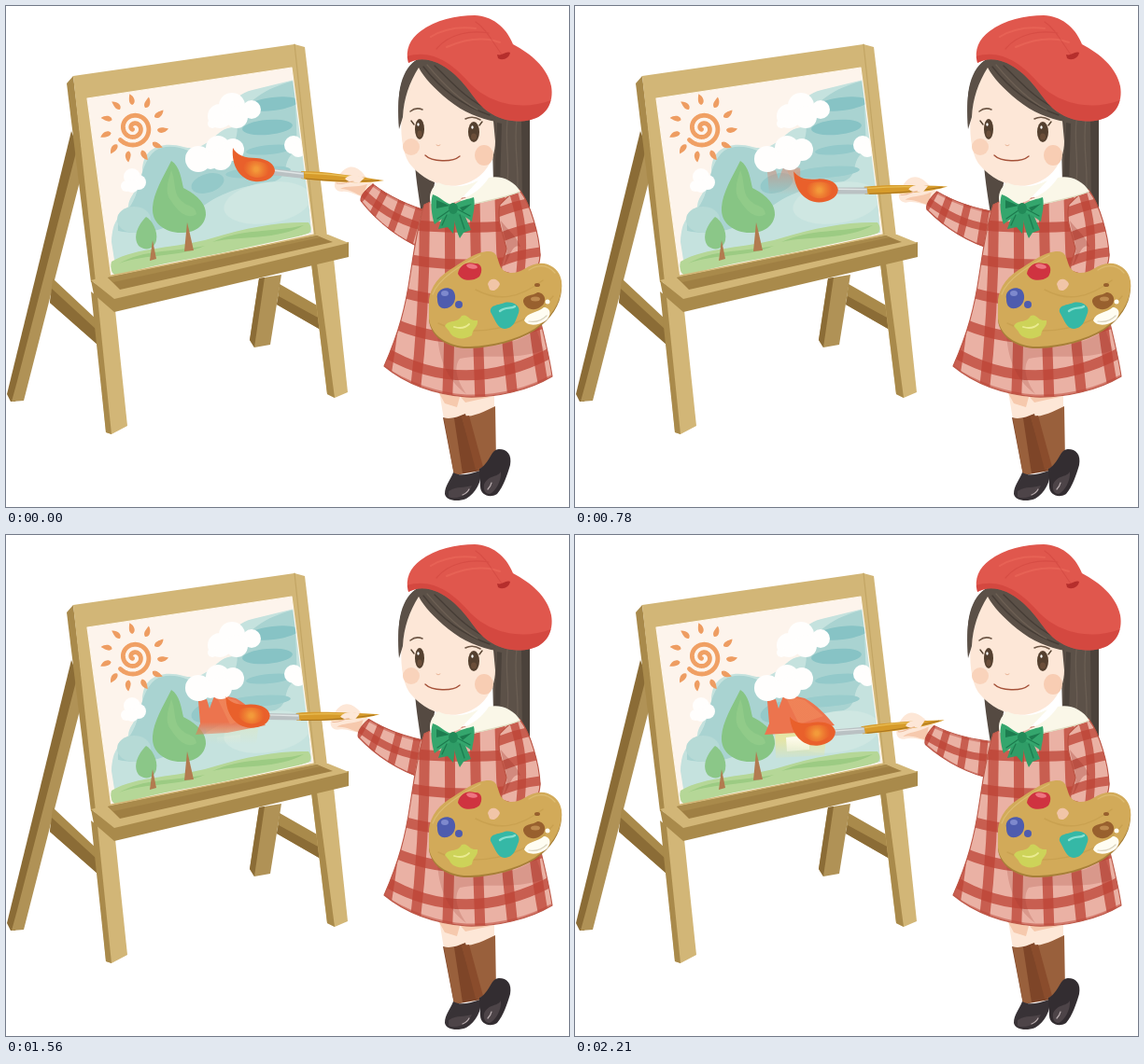
These frames come from a looping animation (603 px wide and 537 px high, 2.34 s). An HTML page with a canvas:

```html
<!DOCTYPE html>
<html lang="en">
<head>
<meta charset="utf-8">
<title>Girl painting</title>
<style>
html, body { margin: 0; width: 100%; height: 100%; overflow: hidden; background: #fff; }
canvas { display: block; width: 603px; height: 537px; }
</style>
</head>
<body>
<canvas id="stage"></canvas>
<script>
const STEP = 130, STEPS = 18;
const canvas = document.getElementById('stage');
const ctx = canvas.getContext('2d');
const dpr = window.devicePixelRatio || 1;
canvas.width = 603 * dpr;
canvas.height = 537 * dpr;

const clamp = (v, a = 0, b = 1) => Math.min(b, Math.max(a, v));

function fill(color, d) {
  ctx.fillStyle = color;
  ctx.fill(new Path2D(d));
}
function line(color, width, d) {
  ctx.strokeStyle = color;
  ctx.lineWidth = width;
  ctx.lineCap = ctx.lineJoin = 'round';
  ctx.stroke(new Path2D(d));
}
function oval(color, x, y, rx, ry = rx, turn = 0) {
  ctx.fillStyle = color;
  ctx.beginPath();
  ctx.ellipse(x, y, rx, ry, turn, 0, 7);
  ctx.fill();
}
function clipped(d, draw) {
  ctx.save();
  ctx.clip(new Path2D(d));
  draw();
  ctx.restore();
}

const WOOD = '#d2b677', WOOD_MID = '#a98a4b', WOOD_DARK = '#8b6c36';

function easel() {
  // rear legs and braces
  fill(WOOD_DARK, 'M70 134L80 160L10 424L5 424L1 416Z');
  fill('#b09256', 'M75 157L86 160L80 184L19 423L6 424L12 402Z');
  fill(WOOD_MID, 'M50 292L97 336V362L47 318Z');
  fill(WOOD_DARK, 'M49 303L97 347V362L47 318Z');
  fill('#b09256', 'M271 292L295 288L283 363L266 366L261 358Z');
  fill(WOOD_DARK, 'M271 292L277 291L266 366L261 358Z');
  fill(WOOD_MID, 'M293 298L335 322L337 347L290 320Z');
  fill(WOOD_DARK, 'M292 311L336 335L337 347L290 320Z');
  // front legs
  fill(WOOD, 'M327 276L351 271L366 414L352 420L344 416Z');
  fill(WOOD_MID, 'M327 276L333 276L352 420L344 416Z');
  fill(WOOD, 'M93 308L117 326L130 450L113 459L107 457Z');
  fill(WOOD_MID, 'M91 306L98 312L113 459L107 457Z');
  // board
  fill(WOOD_MID, 'M65 83L72 75L98 296L91 296Z');
  fill(WOOD, 'M72 75L309 41L320 44L344 247L330 250L96 296Z');
  line('#c2a564', 1.2, 'M309 41L331 245');
}

function tray() {
  fill(WOOD_MID, 'M91 294L116 312L367 253V269L116 328L94 309Z');
  fill(WOOD, 'M91 294L109 289L333 245L345 245L367 254L116 314Z');
  fill('#9f7f43', 'M109 291L333 246L350 253L122 304Z');
  fill(WOOD_MID, 'M109 291L333 246L337 248L115 296Z');
}

function cloud(puffs) {
  for (const [x, y, r] of puffs) oval('#fffefd', x, y, r);
}

function sun(x, y) {
  ctx.strokeStyle = '#f0a064';
  ctx.lineCap = 'round';
  ctx.lineWidth = 4.8;
  ctx.beginPath();
  for (let a = 0; a < 12.6; a += 0.1) {
    const r = 2 + a * 1.36;
    ctx.lineTo(x + r * Math.cos(a + 2.4), y + r * Math.sin(a + 2.4));
  }
  ctx.stroke();
  for (let i = 0; i < 11; i++) {
    ctx.save();
    ctx.translate(x, y);
    ctx.rotate(i * Math.PI / 5.5 + 0.07);
    fill('#ee9d62', 'M25 0C27 -4 32 -3 37 -2C34 3 27 5 25 0Z');
    ctx.restore();
  }
}

function house(k) {
  if (k < 2) return;
  const edge = 174 + k * 3.7;
  const shade = (rgb, a) => {
    const g = ctx.createLinearGradient(0, edge - 18, 0, edge + 6);
    g.addColorStop(0, `rgba(${rgb},${a})`);
    g.addColorStop(1, `rgba(${rgb},0)`);
    return g;
  };
  ctx.save();
  ctx.beginPath();
  ctx.rect(200, 160, k < 7 ? 22 + k * 3.2 : 90, 90);
  ctx.clip();
  const wall = clamp((k - 9) / 8);
  if (wall) {
    fill(shade('229,229,166', wall), 'M214 207L233 206L270 207L267 236L215 239Z');
    fill(shade('252,250,234', wall), 'M226 217L251 214L251 230L227 232Z');
  }
  const a = clamp((k - 1) / 11);
  const red = k < 11 ? '224,130,107' : '236,116,78';
  fill(shade(red, a), 'M206 178L215 176L218 186L224 170L246 175C259 182 270 194 278 204L237 212L203 214L208 202Z');
  fill(shade('243,145,97', a * 0.5), 'M225 172L246 177L266 194L240 203Z');
  ctx.restore();
}

function painting(k) {
  const sheet = 'M87 99L306 66L329 244L113 291Z';
  clipped(sheet, () => {
    fill('#fdf4ec', sheet);
    fill('#c5e2de', 'M113 253C114 228 122 226 131 215C132 201 143 199 146 177C146 151 168 145 190 151C217 158 223 131 243 130C234 118 239 96 264 90L313 78L327 243L116 272Z');
    fill('#a9d3d1', 'M132 216C146 198 142 169 160 155C174 146 197 152 211 166C238 171 251 142 247 125C257 102 277 88 309 80L312 154C291 167 309 184 281 190C252 192 220 203 198 226C174 236 154 248 120 241C119 230 124 222 132 216Z');
    const wash = '#87c3c5';
    oval(wash, 286, 105, 28, 7, -0.12);
    oval(wash, 280, 130, 27, 8, -0.08);
    oval('#93c9ca', 282, 154, 25, 5, -0.1);
    oval('#99cccc', 270, 178, 35, 6, -0.08);
    oval('#94c9c9', 216, 190, 18, 10, -0.3);
    oval('#b6dad6', 137, 229, 18, 14);
    oval('#cfe7e2', 280, 211, 47, 22, -0.15);
    // ground
    fill('#b5d797', 'M113 274C139 258 183 260 220 249C258 237 294 231 324 232C328 237 327 243 323 244C276 261 180 270 119 289C113 288 111 281 113 274Z');
    fill('#9ccb83', 'M121 276C151 265 184 270 213 257C177 264 147 261 121 276ZM221 253C253 238 287 243 319 235C292 251 251 246 221 253Z');
    // trees
    fill('#87c584', 'M177 166C186 171 188 186 190 195C202 201 215 211 214 224C212 239 198 244 184 243C168 241 156 232 157 216C158 200 168 184 177 166Z');
    fill('rgba(160,210,146,.4)', 'M177 176C182 187 179 199 186 207C195 217 202 212 204 223C194 230 183 219 177 209C169 200 174 187 177 176Z');
    fill('#b27b50', 'M194 232L196 240L201 262L191 263Z');
    fill('#8bc788', 'M150 226C156 229 163 241 161 251C159 261 149 263 142 257C135 247 142 234 150 226Z');
    fill('#b27b50', 'M157 251L161 271L154 273Z');
    house(k);
    cloud([[206, 164, 14], [227, 152, 13], [243, 154, 12], [230, 164, 12], [219, 165, 10]]);
    cloud([[229, 118, 13], [242, 107, 14], [263, 111, 10], [247, 119, 12], [221, 126, 5]]);
    cloud([[135, 183, 9], [129, 193, 6], [142, 189, 8], [135, 193, 7]]);
    cloud([[308, 149, 10], [313, 154, 8]]);
    sun(137, 131);
  });
  line('#fff7ec', 1.2, sheet);
}

const SKIN = '#fde7d7', SKIN_SHADE = '#f6c9ad', CLOTH = '#eab1a4', BAND = 'rgba(190,69,54,.76)';

function legs() {
  fill(SKIN, 'M464 413L491 416L492 445L469 443Z');
  fill(SKIN, 'M484 414H523V434L490 442Z');
  fill(SKIN_SHADE, 'M464 415L486 419L483 430L470 426ZM487 419L519 419L492 425Z');
  fill('#7e4528', 'M468 441C476 444 484 440 492 437L509 498L480 503Z');
  fill('#99603c', 'M469 442L480 442L489 501L480 503Z');
  fill('#99603c', 'M488 440C499 441 512 435 524 429L525 488L505 497Z');
  fill('#8a4c2c', 'M488 440L496 439L511 494L503 497Z');
  fill('#383236', 'M479 500C487 505 498 501 508 498C510 510 503 522 493 528C483 532 471 530 470 523C470 514 476 508 479 500Z');
  fill('#4d4448', 'M474 520C483 514 491 517 499 514C495 524 483 530 474 526Z');
  fill('#332d31', 'M507 496C518 491 519 475 528 475C537 475 542 481 540 492C537 502 533 515 526 523C518 528 508 524 508 515Z');
  fill('#4d4448', 'M512 513C517 502 526 506 530 499C531 508 525 520 518 523C513 523 511 518 512 513Z');
  line('#b9adaf', 1.2, 'M489 524Q494 522 496 518M516 518Q519 515 520 511');
}

function backHair() {
  fill('#5c5148', 'M520 105H561V224C551 209 536 204 522 190Z');
  fill('#4b423b', 'M552 122L561 118V224L553 211ZM526 125L531 126L529 193L523 187Z');
  line('#6a5e53', 1.3, 'M537 123C534 150 541 171 536 195M547 122C543 153 551 175 547 206');
  fill('#554a42', 'M437 155L460 184L455 214L445 223C442 203 438 180 437 155Z');
}

function arm(p) {
  ctx.save();
  ctx.translate(448, 240 + 2 * p);
  ctx.rotate(-11 * Math.PI / 180 * p);
  ctx.translate(-448, -240);
  // hand
  fill(SKIN, 'M352 190C355 183 360 175 367 173C375 171 381 177 386 184L394 192L383 205C375 203 368 198 360 199C355 199 351 196 352 190Z');
  fill(SKIN_SHADE, 'M358 196C365 192 374 195 387 191L382 204C375 202 369 196 358 196Z');
  // sleeve
  const sleeve = 'M393 191C410 204 431 214 456 221L466 255L446 260C422 250 398 232 380 209C379 203 386 196 393 191Z';
  fill(CLOTH, sleeve);
  clipped(sleeve, () => {
    line(BAND, 8, 'M391 190L380 206M407 196L392 225M425 206L411 244M444 212L431 258');
    line(BAND, 8, 'M384 202C406 222 426 233 459 240');
    line('rgba(186,66,52,.45)', 5, 'M393 191C412 205 430 214 454 220M380 211C398 234 420 251 444 260');
  });
  line('#b95040', 1, sleeve);
  // brush
  fill('#d69b2b', 'M316 177C340 177 373 182 405 187C385 191 350 189 316 185Z');
  line('#e9bd53', 1.3, 'M320 179Q350 180 375 184');
  line('#a8741f', 1, 'M321 185Q360 189 399 187');
  fill('#bac1c3', 'M283 174L319 178V185L284 181Z');
  line('#e0e6e6', 1.3, 'M286 176L318 180');
  fill('#e9602b', 'M243 152C247 160 256 163 268 163C281 164 288 170 288 177C286 186 276 189 266 188C251 186 241 172 243 152Z');
  const glow = ctx.createRadialGradient(268, 175, 2, 268, 175, 14);
  glow.addColorStop(0, '#f39a3a');
  glow.addColorStop(1, 'rgba(240,138,50,0)');
  fill(glow, 'M252 169C264 163 280 166 286 176C275 188 257 187 252 169Z');
  // thumb over the handle
  fill(SKIN, 'M363 185C368 180 376 181 384 184L378 190C372 188 367 190 363 185Z');
  line('#eebc9e', 1, 'M354 190C361 192 366 188 372 188');
  ctx.restore();
}

function dress() {
  const body = 'M448 213C458 207 470 205 490 206L550 197C559 209 564 225 567 241L572 267L565 307C572 338 580 364 585 397C560 412 525 420 493 419C458 416 428 405 405 386C421 350 428 322 433 288C437 263 440 238 448 213Z';
  fill(CLOTH, body);
  clipped(body, () => {
    for (let i = -1; i < 5; i++) {
      const top = 448 + 27 * i, low = 437 + 35.5 * i;
      line(BAND, 11, `M${top} 205Q${top + 2} 320 ${low} 425`);
    }
    for (let i = 0; i < 5; i++) {
      const y = 232 + 34 * i, sag = 8 + i * 7;
      line(BAND, 11, `M398 ${y - 2}Q490 ${y + sag * 1.6} 594 ${y - 2}`);
    }
    line('rgba(190,69,54,.5)', 5, 'M402 386C428 406 464 417 493 419C530 420 560 412 588 396');
    fill('rgba(151,54,42,.2)', 'M462 350C485 369 534 371 568 347L576 369C543 381 507 372 486 378C478 389 485 404 493 416C470 399 463 374 462 350Z');
  });
  line('#bd5848', 1.1, body);
  // bent sleeve
  const sleeve = 'M529 213C538 203 546 197 551 199C562 213 571 245 572 266C572 280 565 289 555 291L531 284C529 275 535 269 536 260C532 242 525 229 529 213Z';
  fill(CLOTH, sleeve);
  clipped(sleeve, () => {
    line(BAND, 10, 'M525 222Q545 214 565 210M530 248Q548 240 575 235M528 275Q551 265 577 263');
    line(BAND, 9, 'M543 198C551 224 556 247 550 294');
    fill('rgba(154,49,39,.3)', 'M530 230C537 240 546 245 551 258C542 253 539 272 533 279C541 259 533 249 530 230Z');
  });
  line('#b95040', 1.1, sleeve);
}

function collarAndBow() {
  fill('#faf7e8', 'M455 212C452 203 456 194 463 189C476 196 492 194 506 187L486 208L470 215Z');
  fill('#faf7e8', 'M486 208C500 203 511 194 517 184C530 181 544 187 551 199C537 205 518 208 497 214Z');
  line('#dedcc0', 1.1, 'M497 213C519 208 536 205 550 199');
  const green = '#2f9d67';
  fill(green, 'M470 218L463 239L473 237L479 244L482 220Z');
  fill(green, 'M479 219C480 231 482 240 486 249L490 243L498 240L489 219Z');
  fill('#34a66d', 'M477 213C470 211 464 204 457 202C454 211 456 225 459 234C466 229 473 223 478 221Z');
  fill('#34a66d', 'M480 213C487 208 495 207 501 205C503 214 500 223 499 231C492 226 486 222 480 221Z');
  fill('#1d7c4f', 'M461 208L475 214L461 217ZM486 216L499 212L489 220Z');
  line('#1d7c4f', 1.3, 'M462 228L475 219M472 224L467 235M486 224L491 239M484 218L497 225');
  oval('#228a58', 479, 217, 5, 6);
}

function head() {
  fill('#564b43', 'M421 116C418 82 429 59 448 54C490 52 517 81 525 128L519 162L438 162Z');
  fill(SKIN, 'M425 105C431 83 437 72 442 62C458 80 485 105 521 112L524 145C524 169 508 188 486 192C466 196 446 185 434 171C424 160 421 132 425 105Z');
  oval('#f9d3bb', 434, 151, 9, 9);
  oval('#f8cdb3', 512, 160, 10, 11);
  // eyes
  for (const [x, y, rx] of [[443, 132, 5], [501, 135, 6]]) {
    oval('#54402f', x, y, rx, 11);
    oval('#6b4e39', x, y + 5, rx * 0.5, 3.5);
    oval('#fff', x - 1.5, y - 5, 1.2, 1.8);
  }
  line('#54402f', 1.4, 'M437 127L434 123M507 128L510 124');
  line('#6f5847', 1.6, 'M433 113Q439 108 446 111M492 121Q500 117 508 122');
  line('#e9b598', 1, 'M461 149Q463 151 465 149');
  line('#a55239', 1.4, 'M449 160C456 167 478 168 486 161');
  // fringe
  fill('#5b5047', 'M437 60C451 49 477 56 498 76C511 90 520 104 525 124C508 121 490 114 474 101C458 88 448 77 442 66C432 82 426 99 425 119L421 132C418 95 423 74 437 60Z');
  line('#463d36', 1.4, 'M447 65C464 87 487 106 518 117M459 64C478 82 495 102 516 110');
  line('#6d6054', 1.2, 'M451 63C466 81 486 101 505 111');
}

function beret() {
  const shape = 'M431 61C427 47 433 35 444 27C460 15 482 10 502 10C520 11 535 21 543 41C562 51 580 66 584 86C587 103 579 118 562 122C545 126 529 122 516 113C502 103 497 88 479 72C463 58 445 53 431 61Z';
  fill('#e0574d', shape);
  clipped(shape, () => {
    fill('rgba(201,58,52,.5)', 'M429 54C455 46 477 60 496 82C516 104 552 114 586 100V128H520L474 78L429 66Z');
    line('rgba(242,117,101,.35)', 2, 'M455 33C470 24 486 22 503 24M472 44C493 35 512 33 529 39');
    line('rgba(193,55,50,.3)', 1.2, 'M461 46C475 29 498 26 517 29M503 17C514 24 520 37 531 52');
  });
  fill('#b52e2c', 'M526 52C531 54 535 48 540 50C539 56 532 59 527 56Z');
}

function palette() {
  const shape = 'M453 320C452 307 460 292 475 283C488 275 500 265 515 263C526 262 526 270 529 278C533 288 545 288 555 282C565 275 577 273 586 280C593 285 596 293 595 302C594 318 584 334 566 346C546 358 521 364 497 365C474 366 455 353 453 335Z';
  ctx.save();
  ctx.translate(0, 2);
  fill('#a77f38', shape);
  ctx.restore();
  fill('#d2aa59', shape);
  line('#dcbb70', 1.2, 'M457 309C463 292 487 278 508 267M560 283C570 277 580 277 588 286');
  line('rgba(180,138,62,.3)', 1.5, 'M463 340C497 357 557 347 586 311M503 304C527 317 549 314 575 294');
  fill('#cf3340', 'M484 287C485 278 494 273 502 276C510 275 511 284 507 290C499 296 488 295 484 287Z');
  oval('#ee7580', 499, 279, 6, 2.5, 0.2);
  fill('#f1c5a7', 'M516 298C518 290 527 292 529 298C527 303 523 307 518 304Z');
  fill('#4e5cae', 'M462 314C460 305 470 299 478 304C484 310 481 322 472 324C465 325 462 321 462 314Z');
  oval('#7e89cd', 470, 308, 4, 3);
  oval('#4e5cae', 485, 320, 4);
  fill('#cdd359', 'M470 343C475 335 483 341 488 332C495 329 495 338 505 337C506 344 500 345 499 353C488 360 477 355 475 349Z');
  line('#eaeb91', 1.8, 'M480 344Q490 347 496 341');
  fill('#35b8a6', 'M519 328C518 320 527 321 534 318C542 316 552 321 549 329C546 336 545 345 534 346C527 346 524 337 519 328Z');
  line('#8adfd0', 2.4, 'M529 327C535 322 541 325 545 322');
  fill('#98602e', 'M554 317C554 309 564 311 569 307C578 307 580 318 573 322C566 328 556 325 554 317Z');
  oval('#bd8a50', 567, 314, 5, 2.5);
  oval('#98602e', 569, 299, 3, 2);
  fill('#fffdf2', 'M555 337C558 328 569 329 576 323C584 323 585 333 577 338C569 343 558 343 555 337Z');
  line('#d9d2bc', 1.2, 'M560 338Q571 340 579 332');
  oval('#fffdf2', 580, 317, 2.5);
}

function draw(k) {
  ctx.setTransform(dpr, 0, 0, dpr, 0, 0);
  ctx.fillStyle = '#fff';
  ctx.fillRect(0, 0, 603, 537);
  easel();
  painting(k);
  tray();
  backHair();
  legs();
  // two downward strokes, the second longer
  arm((k < 7 ? k : k - 7) / 10);
  dress();
  head();
  collarAndBow();
  beret();
  palette();
}

let last = -1, start = performance.now();
function tick(now) {
  const k = Math.floor(Math.max(0, now - start) / STEP) % STEPS;
  if (k !== last) draw(last = k);
  requestAnimationFrame(tick);
}
tick(start);
</script>
</body>
</html>
```
